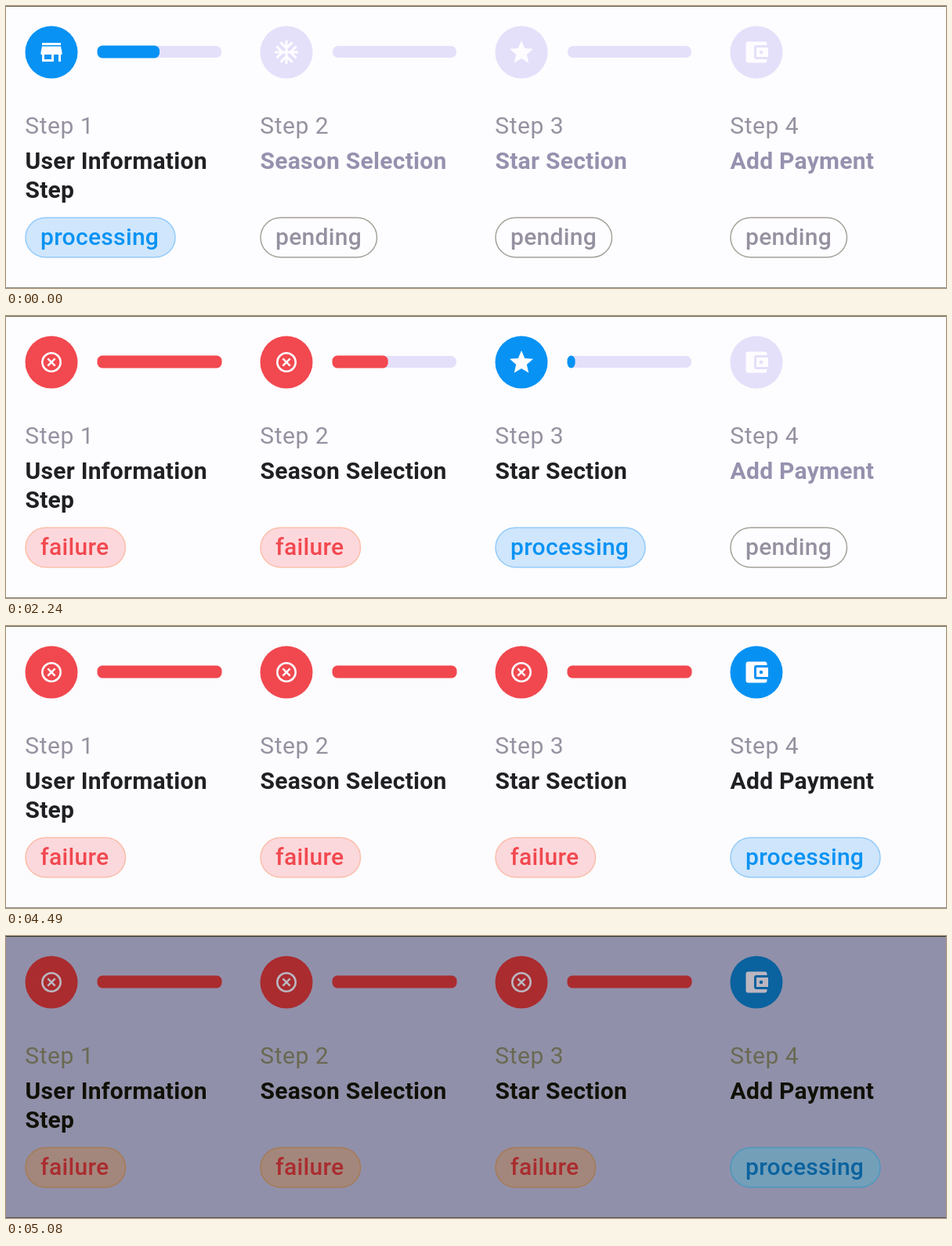
Animation, 1200 px wide and 360 px high, one loop 5280 ms. Source, as an HTML page:

```html
<!DOCTYPE html>
<html lang="en">
<head>
<meta charset="utf-8">
<title>Step progress</title>
<style>
  html, body { margin: 0; width: 100%; height: 100%; overflow: hidden; }
  svg {
    --track: #e4e0fa; --gray: #9691ae; --grayEdge: #a5a29a;
    display: block; width: 100vw; height: 100vh; font: 30px Roboto, sans-serif;
  }
  .bg { fill: var(--bg); }
  .track { fill: var(--track); }
  .label { fill: var(--label); letter-spacing: .53px; }
  .title { font-weight: 600; letter-spacing: .27px; fill: var(--title); }
  .status { font-weight: 500; letter-spacing: .3px; fill: var(--main); }
  .disc, .fill { fill: var(--main); }
  .chip { fill: var(--soft); stroke: var(--edge); stroke-width: 1.5; }
  .solid { fill: var(--icon); }
  .line { fill: none; stroke: var(--icon); }
  .pending { --soft: none; --edge: var(--grayEdge); }
  .pending .disc { fill: var(--track); }
  .pending .title { fill: var(--gray); }
  .pending .status { fill: var(--label); }
  .processing { --main: var(--blue); --soft: var(--blueSoft); --edge: var(--blueEdge); }
  .failure { --main: var(--red); --soft: var(--redSoft); --edge: var(--redEdge); }
</style>
</head>
<body>
<svg id="stage" viewBox="0 0 1200 360" preserveAspectRatio="none"></svg>
<script>
const LOOP = 5280;
const ADVANCE = 900;            // time a bar needs to reach its goal
const STARTS = [-ADVANCE, 870, 2051, 3572];
const DIM_START = 4490, DIM_TIME = 220, DIM_MIDDLE = .6;

// Each colour: bright, halfway, dimmed
const PALETTE = {
  bg: ['#fdfcfe', '#bebdad', '#9190aa'],
  icon: ['#fefcff', '#d3cccd', '#bbb6c0'],
  label: ['#9691a0', '#77737a', '#696952'],
  title: ['#1f2024', '#191a18', '#101006'],
  blue: ['#0792f4', '#0570b2', '#0a629f'],
  blueSoft: ['#cfe6fc', '#8fb5ab', '#739fb9'],
  blueEdge: ['#93cbf9', '#7db4b4', '#4d98bd'],
  red: ['#f2484f', '#bf4a50', '#aa2c2f'],
  redSoft: ['#fcd8dd', '#bcafae', '#a4877c'],
  redEdge: ['#fcbfa9', '#b692ae', '#a57b55'],
  topLine: ['#68664c', '#4f4d38', '#35341c'],
  bottomLine: ['#918f88', '#6e6c66', '#54534e']
};

const solid = d => `<path class="solid" fill-rule="evenodd" d="${d}"/>`;
const flakeArm = turn => `<path class="line" stroke-width="2"
  transform="rotate(${turn} 12 12)" d="M12 12V2M7 3.6l5 5 5-5"/>`;

const ICONS = {
  store: solid('M20 4H4v2h16zm1 10v-2l-1-5H4l-1 5v2h1v6h10v-6h4v6h2v-6zm-9 4H6v-4h6z'),
  flake: [0, 90, 180, 270].map(flakeArm).join(''),
  star: solid('M12 17.27L18.18 21l-1.64-7.03L22 9.24l-7.19-.61L12 2 9.19 8.63 2 9.24l5.46 4.73L5.82 21z'),
  wallet: solid('M21 18v1a2 2 0 0 1-2 2H5a2 2 0 0 1-2-2V5a2 2 0 0 1 2-2h14a2 2 0 0 1 2 2v1h-9a2 2 0 0 0-2 2v8a2 2 0 0 0 2 2z' +
    'm-9-2h10V8H12zm4-2.5a1.5 1.5 0 0 1 0-3 1.5 1.5 0 0 1 0 3z'),
  cross: '<path class="line" stroke-width="1.7" d="M8.9 8.9l6.2 6.2m0-6.2l-6.2 6.2"/>' +
    '<circle class="line" stroke-width="1.7" cx="12" cy="12" r="7.8"/>'
};

const STEPS = [
  { icon: 'store', title: ['User Information', 'Step'], goal: .5 },
  { icon: 'flake', title: ['Season Selection'], goal: .3 },
  { icon: 'star', title: ['Star Section'], goal: .3 },
  { icon: 'wallet', title: ['Add Payment'], goal: 0 }
];
const BAR = 159;
const CHIP_WIDTHS = { pending: 148.5, processing: 191, failure: 127.5 };

const stage = document.getElementById('stage');

function stepMarkup({ icon, title }, i) {
  const bar = i < STEPS.length - 1
    ? `<rect class="track" x="117" y="51" width="158" height="15" rx="7"/>
       <rect class="fill" x="116.5" y="50.5" height="16" rx="6.5"/>` : '';
  const lines = title.map((text, n) =>
    `<text class="title" x="24.5" y="${208 + 37 * n}">${text}</text>`).join('');
  return `<g class="step" transform="translate(${300 * i})">
    <circle class="disc" cx="58" cy="59" r="33.5"/>
    <g class="icon" transform="translate(40 41) scale(1.5)">${ICONS[icon]}</g>
    ${bar}
    <text class="label" x="24.3" y="163">Step ${i + 1}</text>
    ${lines}
    <rect class="chip" x="25" y="270.3" height="50.4" rx="25.2"/>
    <text class="status" x="44" y="305"></text>
  </g>`;
}

stage.innerHTML = `<rect class="bg" width="1200" height="360"/>
  <rect width="1200" height="1" fill="var(--topLine)"/>
  <rect y="359" width="1200" height="1" fill="var(--bottomLine)"/>
  ${STEPS.map(stepMarkup).join('')}`;

const views = [...stage.querySelectorAll('.step')].map(group => {
  const part = name => group.querySelector('.' + name);
  return { group, icon: part('icon'), fill: part('fill'), chip: part('chip'), status: part('status') };
});

const clamp = v => Math.max(0, Math.min(1, v));
const channels = hex => [1, 3, 5].map(i => parseInt(hex.slice(i, i + 2), 16));

function mix(from, to, k) {
  const end = channels(to);
  return `rgb(${channels(from).map((v, i) => Math.round(v + (end[i] - v) * k))})`;
}

function shade([bright, middle, dark], dim) {
  return dim < DIM_MIDDLE
    ? mix(bright, middle, dim / DIM_MIDDLE)
    : mix(middle, dark, (dim - DIM_MIDDLE) / (1 - DIM_MIDDLE));
}

function setState(view, step, state) {
  if (view.state === state) return;
  view.state = state;
  view.group.setAttribute('class', 'step ' + state);
  view.icon.innerHTML = ICONS[state === 'failure' ? 'cross' : step.icon];
  view.chip.setAttribute('width', CHIP_WIDTHS[state]);
  view.status.textContent = state;
}

function render(t) {
  const dim = Math.sin(clamp((t - DIM_START) / DIM_TIME) * Math.PI / 2);
  for (const [name, shades] of Object.entries(PALETTE)) {
    stage.style.setProperty('--' + name, shade(shades, dim));
  }
  STEPS.forEach((step, i) => {
    const view = views[i];
    const begin = STARTS[i], fail = STARTS[i + 1] ?? Infinity;
    setState(view, step, t >= fail ? 'failure' : t >= begin ? 'processing' : 'pending');
    if (!view.fill) return;
    const progress = step.goal * clamp((t - begin) / ADVANCE) +
      (1 - step.goal) * clamp((t - fail) / ADVANCE);
    view.fill.setAttribute('width', BAR * progress);
  });
}

const origin = performance.now();
function tick() {
  render((performance.now() - origin) % LOOP);
  requestAnimationFrame(tick);
}
tick();
</script>
</body>
</html>
```
